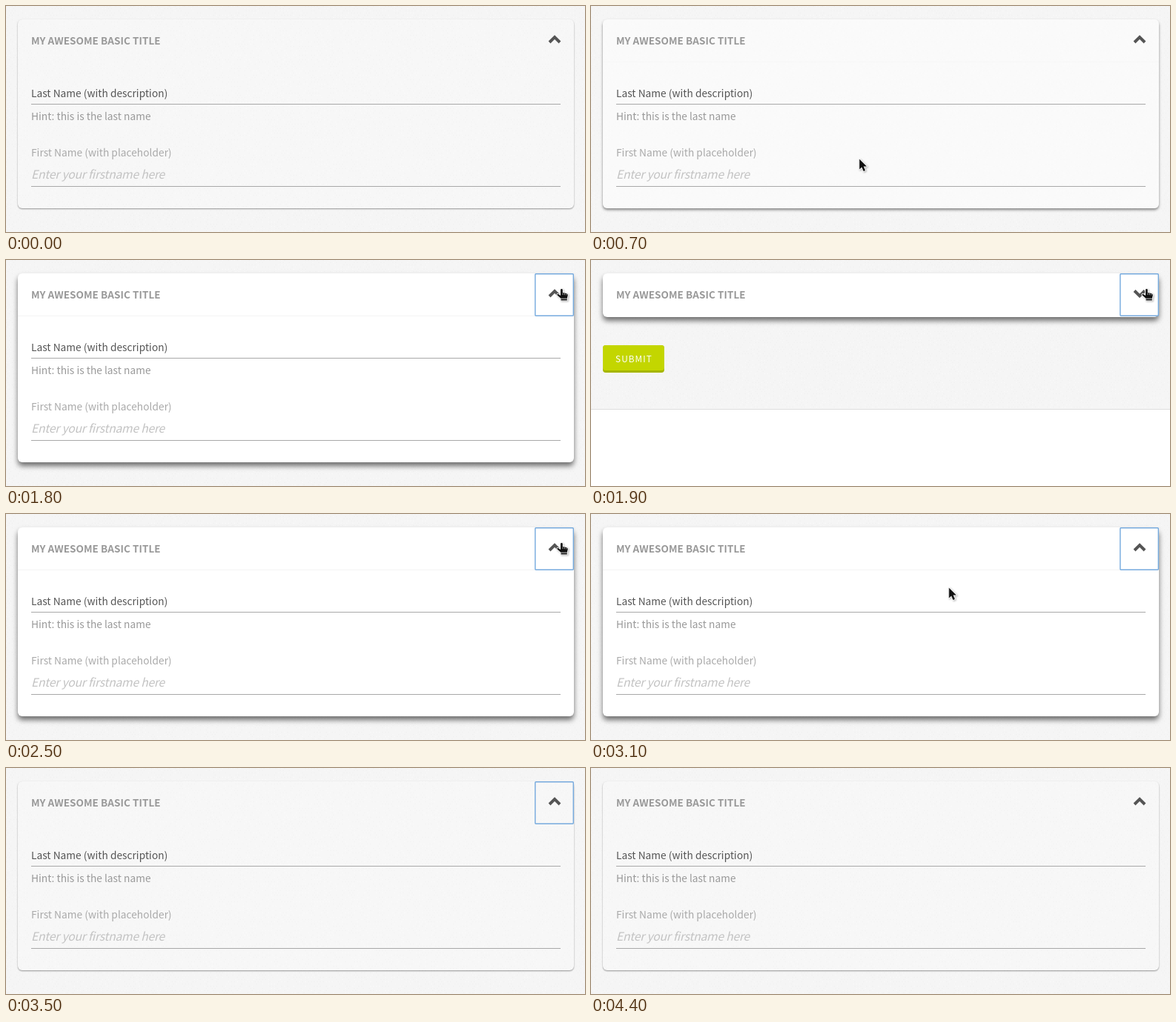
Write an HTML page with a canvas that moves like this. It is 782 by 305 pixels and loops after 4.6 s.

```html
<!DOCTYPE html>
<html lang="en">
<head>
<meta charset="utf-8">
<title>Collapsible form card</title>
<style>
  html, body { margin: 0; width: 100%; height: 100%; overflow: hidden; background: #f5f5f5; }
  #stage { position: relative; width: 782px; height: 305px; overflow: hidden; }
  #stage > * { position: absolute; left: 0; top: 0; }
  #stage > #card { left: 16px; top: 18px; width: 751px; border-radius: 6px; }
  text { font: 13.77px "Noto Sans CJK JP", "Noto Sans CJK SC", "Noto Sans", sans-serif; }
  .title { font-size: 13.6px; font-weight: 700; fill: #999; }
  .label { fill: #555; }
  .hint { fill: #999; }
  .muted { fill: #aaa; }
  .placeholder { font-size: 15.76px; font-style: italic; letter-spacing: -.26px; fill: #c3c3c3; }
  .submit { font-size: 11.8px; letter-spacing: 1.1px; fill: #fff; }
  .rule { stroke: #a8a8a8; }
  .pointer { fill: #111; stroke: #fff; stroke-width: 1.8; paint-order: stroke; stroke-linejoin: round; }
  #cursor { filter: drop-shadow(1px 1px 1px rgba(0, 0, 0, .3)); }
</style>
</head>
<body>
<div id="stage">
  <canvas id="paper" width="782" height="305"></canvas>
  <div id="card"></div>
  <svg width="782" height="305" viewBox="0 0 782 305">
    <text class="title" x="34" y="52">MY AWESOME BASIC TITLE</text>
    <g id="fields">
      <path id="divider" d="M16 75.5H767" stroke="#f4f4f4"/>
      <text class="label" x="34" y="123">Last Name (with description)</text>
      <path class="rule" d="M34 132.5H749"/>
      <text class="hint" x="34" y="154">Hint: this is the last name</text>
      <text class="muted" x="34" y="203">First Name (with placeholder)</text>
      <text class="placeholder" x="34" y="233">Enter your firstname here</text>
      <path class="rule" d="M34 243.5H749"/>
    </g>
    <g id="footer">
      <rect x="16" y="115" width="83" height="37" rx="4" fill="#a6b600"/>
      <rect x="16" y="115" width="83" height="34" rx="4" fill="#c3d600"/>
      <text class="submit" x="33" y="138">SUBMIT</text>
      <rect y="201" width="782" height="104" fill="#fff"/>
      <path d="M0 201.5H782" stroke="#dedede"/>
    </g>
    <path id="chevron" fill="none" stroke="#555" stroke-width="4"/>
    <rect id="focus" x="714.7" y="18.7" width="51.6" height="56.6" rx="1" fill="none" stroke="#76aade" stroke-width="1.4"/>
    <g id="cursor">
      <path id="arrow" class="pointer" d="M.5 1.5V15.5L3.7 12.5L6 18L8.5 17L6.2 11.5H10.5Z"/>
      <g id="hand">
        <path class="pointer" d="M6 8V2.5a1.4 1.4 0 0 1 2.8 0V6l5 1q2 .5 2 2.5l-1 4.5H6.5L1.5 9.6Q.8 8 2.4 7.8L6 10ZM6.5 14.2h8.3v2.2H6.5Z"/>
        <path d="M9 6.5V9M11.4 7V9.2M13.7 7.5V9.4M6.5 14.1h8.3" fill="none" stroke="#fff" stroke-width=".6"/>
      </g>
    </g>
  </svg>
</div>
<script>
const LOOP = 4600, STEP = 100;
const $ = id => document.getElementById(id);
const show = (id, on) => $(id).style.display = on ? "" : "none";
const mix = (a, b, k) => a + (b - a) * k;

// Each row: time, x, y, pointer shape
const path = [
  [0, 0, 0, ""],
  [700, 362, 205, "arrow"], [800, 373, 130, "arrow"], [900, 379, 102, "arrow"],
  [1100, 517, 90, "arrow"], [1200, 630, 74, "arrow"], [1300, 706, 58, "arrow"],
  [1400, 758, 46, "hand"], [1500, 750, 41, "hand"], [1600, 743, 38, "hand"],
  [2600, 738, 45, "hand"], [2700, 690, 62, "arrow"], [2800, 610, 80, "arrow"],
  [2900, 545, 92, "arrow"], [3000, 505, 97, "arrow"], [3100, 483, 98, "arrow"],
  [3200, 465, 145, "arrow"], [3300, 445, 225, "arrow"], [3400, 0, 0, ""]
];

function hoverAt(t) {
  if (t < 2000) return Math.min(1, Math.max(0, (t - 600) / 300));
  return Math.min(1, Math.max(0, (3500 - t) / 300));
}

function paintPaper() {
  const c = $("paper").getContext("2d");
  let seed = 7;
  const rnd = () => (seed = seed * 16807 % 2147483647) / 2147483647;
  c.fillStyle = "#f5f5f5";
  c.fillRect(0, 0, 782, 305);
  for (let y = 0; y < 305; y += 3) {
    for (let x = y / 3 % 2 * 2; x < 782; x += 4) {
      const r = rnd();
      if (r > .6) continue;
      c.fillStyle = r < .35 ? "rgba(0,0,0,.022)" : "rgba(255,255,255,.5)";
      c.fillRect(x, y, 1, 1);
    }
  }
}

function draw(t) {
  const closed = t >= 1900 && t < 2500;
  const k = hoverAt(t);
  const card = $("card").style;
  card.height = (closed ? 59 : 255) + "px";
  card.background = `rgba(255,255,255,${mix(.2, 1, k)})`;
  card.boxShadow = `0 ${mix(1, 5, k)}px ${mix(2, 7, k)}px rgba(0,0,0,${mix(.4, .55, k)})`;
  show("fields", !closed);
  show("footer", closed);
  $("divider").style.opacity = k;
  $("chevron").setAttribute("d", closed ? "M734 41.5L741 48.5L748 41.5" : "M734 49L741 42L748 49");
  show("focus", t >= 1800 && t < 4400);

  const [, x, y, shape] = path.findLast(p => p[0] <= t);
  show("arrow", shape === "arrow");
  show("hand", shape === "hand");
  $("cursor").setAttribute("transform", `translate(${x} ${y})`);
}

const start = performance.now();
function tick() {
  const t = (performance.now() - start) % LOOP;
  draw(Math.floor(t / STEP) * STEP);
  requestAnimationFrame(tick);
}
paintPaper();
tick();
</script>
</body>
</html>
```
